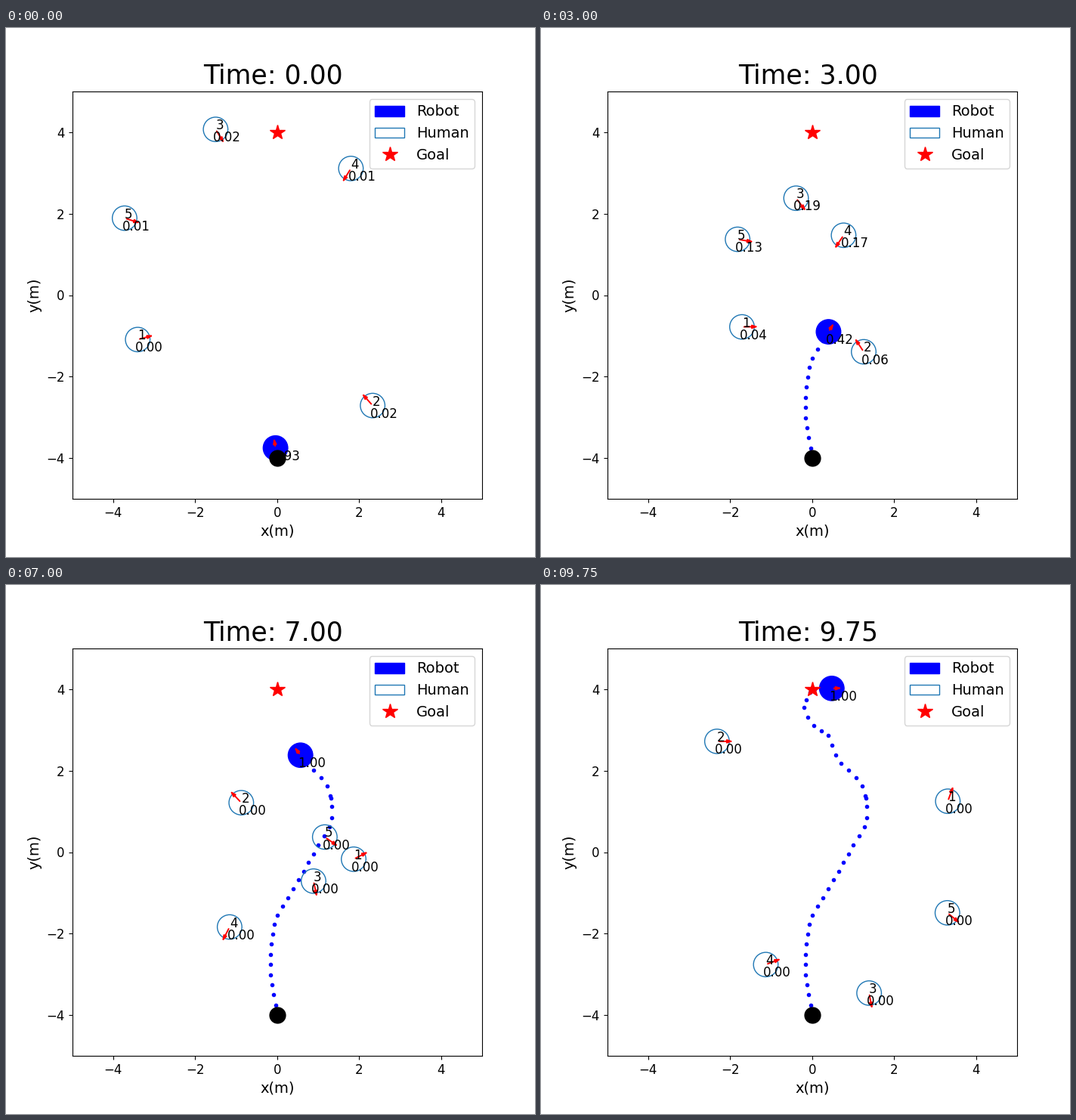
A matplotlib script for the animation above (10 s loop, 700x700 px).

```python
import numpy as np
import matplotlib.pyplot as plt
from matplotlib.animation import FuncAnimation
from matplotlib.patches import ArrowStyle, Circle, FancyArrowPatch

STEPS = 40
DT = 0.25
RADIUS = 0.3
START = (0, -4)
GOAL = (0, 4)

# Waypoints: (step, x, y) in metres
ROBOT_PATH = [
    (-1, *START), (4, -.17, -2.76), (8, -.07, -1.77), (12, .40, -.90),
    (17, 1.0, .18), (20, 1.34, .84), (22, 1.32, 1.33), (23, 1.30, 1.39),
    (24, 1.22, 1.63), (28, .57, 2.38), (30, .40, 2.86), (32, .04, 3.10),
    (34, -.19, 3.55), (37, .06, 4.0), (39, .48, 4.02),
]

# Waypoints and attention bump (peak, centre step, width) of each human
HUMANS = [
    ([(0, -3.40, -1.09), (7, -2.49, -.80), (17, -.80, -.76), (24, .90, -.56),
      (35, 3.14, .83), (39, 3.31, 1.25)], (.042, 9.5, 4.5)),
    ([(0, 2.33, -2.71), (7, 1.68, -1.99), (17, .79, -.71), (24, -.21, .49),
      (35, -2.05, 2.44), (37, -2.32, 2.72), (39, -2.32, 2.72)], (.085, 8, 5)),
    ([(0, -1.50, 4.07), (7, -.89, 3.06), (17, .10, 1.64), (24, .67, .22),
      (39, 1.39, -3.46)], (.188, 11.3, 5.5)),
    ([(0, 1.80, 3.11), (7, 1.27, 2.24), (17, .20, .59), (24, -.67, -.90),
      (30, -1.37, -2.25), (35, -1.76, -3.0), (39, -1.13, -2.76)],
     (.185, 10.15, 4.23)),
    ([(0, -3.72, 1.89), (7, -2.64, 1.53), (17, -.95, 1.21), (24, .39, .83),
      (39, 3.30, -1.49)], (.132, 11.4, 5)),
]


class Path:
    """Smooth curve through waypoints that never overshoots them."""

    def __init__(self, waypoints):
        data = np.array(waypoints, float)
        self.t, self.p = data[:, 0], data[:, 1:]
        secant = np.diff(self.p, axis=0) / np.diff(self.t)[:, None]
        a, b = secant[:-1], secant[1:]
        same_way = a * b > 0
        mean = 2 * a * b / np.where(same_way, a + b, 1)
        inner = np.where(same_way, mean, 0)
        self.slope = np.vstack([secant[:1], inner, secant[-1:]])

    def at(self, step):
        i = np.clip(np.searchsorted(self.t, step, "right") - 1, 0, len(self.t) - 2)
        h = self.t[i + 1] - self.t[i]
        u = (step - self.t[i]) / h
        return (self.p[i] + (self.p[i + 1] - self.p[i]) * u * u * (3 - 2 * u)
                + h * self.slope[i] * u * (1 - u) ** 2
                - h * self.slope[i + 1] * u * u * (1 - u))

    def heading(self, step):
        dx, dy = self.at(step) - self.at(step - 1)
        return np.arctan2(dy, dx)


def bump(step, peak, centre, width):
    return peak * np.exp(-((step - centre) / width) ** 2 / 2)


fig, ax = plt.subplots(figsize=(7, 7), dpi=100)
ax.set_xlim(-5, 5)
ax.set_ylim(-5, 5)
ax.set_xticks(range(-4, 5, 2))
ax.set_yticks(range(-4, 5, 2))
ax.tick_params(labelsize=12)
ax.set_xlabel("x(m)", fontsize=14)
ax.set_ylabel("y(m)", fontsize=14)
clock = ax.text(-1.8, 5.2, "", fontsize=25)


class Agent:
    """A circle with a heading arrow, a weight and an optional number."""

    def __init__(self, waypoints, arrow_length, label="", **style):
        self.path = Path(waypoints)
        self.arrow_length = arrow_length
        self.circle = ax.add_patch(Circle((0, 0), RADIUS, **style))
        self.arrow = ax.add_patch(FancyArrowPatch(
            (0, 0), (1, 0), color="red", lw=1.4,
            arrowstyle=ArrowStyle("-|>", head_length=4, head_width=1.3)))
        self.label = ax.text(0, 0, label, fontsize=12)
        self.weight = ax.text(0, 0, "", fontsize=12)

    def place(self, step, weight):
        x, y = self.path.at(step)
        angle = self.path.heading(step)
        tip = (x + self.arrow_length * np.cos(angle),
               y + self.arrow_length * np.sin(angle))
        self.circle.center = x, y
        self.arrow.set_positions((x, y), tip)
        self.label.set_position((x, y))
        self.weight.set_position((x - 0.06, y - 0.3))
        self.weight.set_text(f"{weight:.2f}")


trail, = ax.plot([], [], "o", color="b", ms=3, zorder=0.9)
robot = Agent(ROBOT_PATH, 0.3, color="b")
humans = [Agent(path, 0.45, str(i), fill=False, color="tab:blue")
          for i, (path, _) in enumerate(HUMANS, 1)]
ax.plot(*START, "o", color="black", ms=15)
goal, = ax.plot(*GOAL, "*", color="red", ms=15)
ax.legend([robot.circle, humans[0].circle, goal], ["Robot", "Human", "Goal"],
          fontsize=14, loc="upper right")


def update(step):
    clock.set_text(f"Time: {step * DT:.2f}")
    trail.set_data(*zip(*[robot.path.at(s) for s in range(step + 1)]))
    weights = [bump(step, *shape) for _, shape in HUMANS]
    robot.place(step, 1 - sum(weights))
    for human, weight in zip(humans, weights):
        human.place(step, weight)
    return []


anim = FuncAnimation(fig, update, frames=STEPS, interval=250,
                     repeat=True, repeat_delay=0)
plt.show()
```
